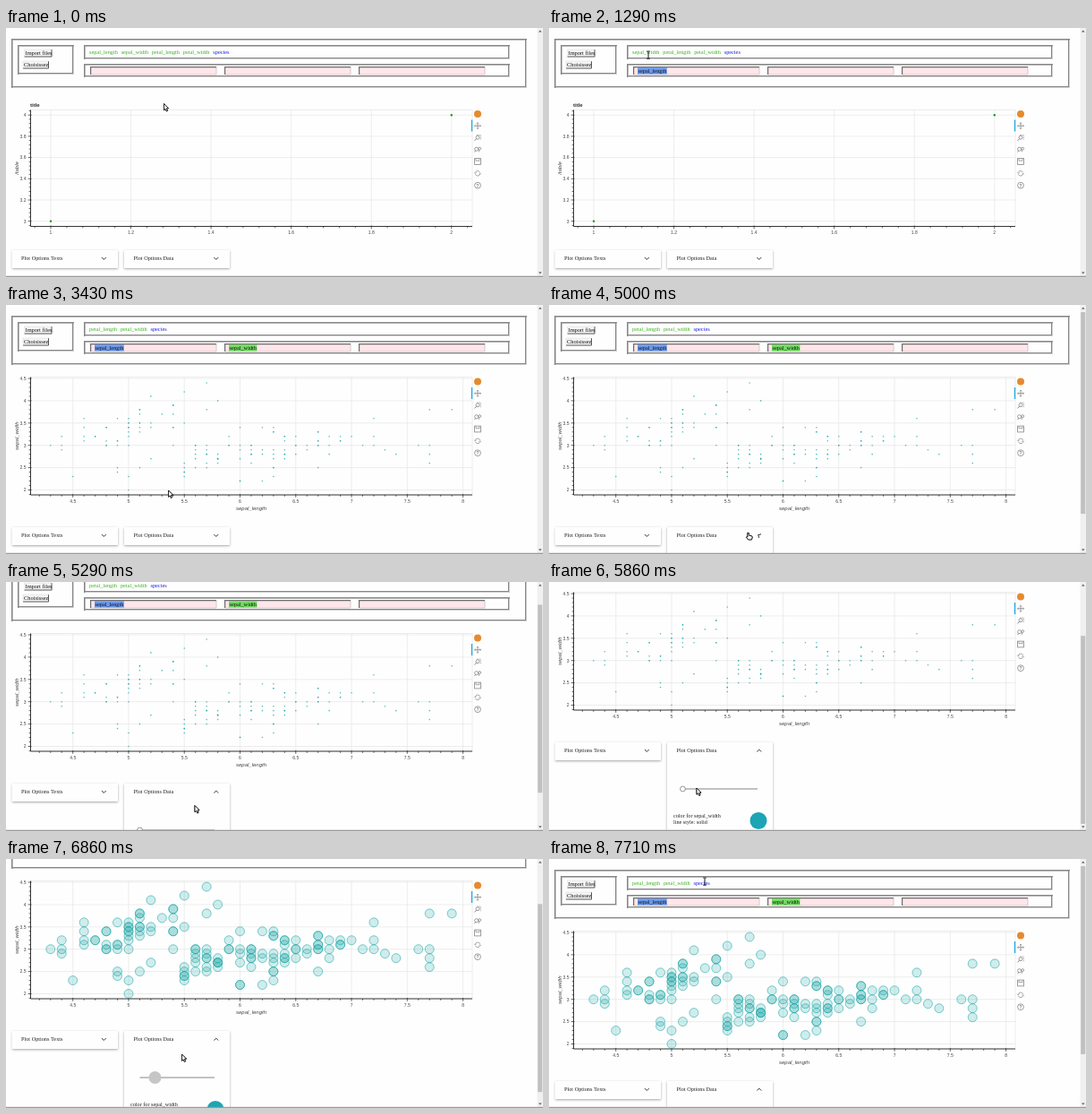
Animation, 600 px wide and 278 px high, one loop 8000 ms. Source, as an HTML page with a canvas:

```html
<!DOCTYPE html>
<html lang="en">
<head>
<meta charset="utf-8">
<title>Plot builder</title>
<style>
  html, body { margin: 0; width: 100%; height: 100%; overflow: hidden; background: #fefefe; }
  canvas { display: block; width: 600px; height: 278px; }
</style>
</head>
<body>
<canvas id="stage"></canvas>
<script>
const W = 600, H = 278, LOOP = 8000, FPS = 7;
const SERIF = '"Liberation Serif", serif', SANS = '"Liberation Sans", sans-serif';
const TEAL = '#1ba5b5', DARK = '#858585';
const canvas = document.getElementById('stage');
const dpr = window.devicePixelRatio || 1;
canvas.width = W * dpr;
canvas.height = H * dpr;
const c = canvas.getContext('2d');

// Sepal widths in mm, one row per sepal length from 4.3 cm in steps of 0.1
const widths = [
  [30], [29, 30, 32], [23], [31, 34, 36, 32], [32, 32], [34, 34, 30, 31, 30],
  [30, 31, 31, 36, 24, 25], [36, 34, 30, 34, 32, 35, 35, 33, 20, 23],
  [35, 35, 38, 37, 33, 34, 38, 25], [35, 34, 41, 27], [37], [39, 37, 39, 34, 34, 30],
  [42, 35, 23, 24, 24, 25, 26], [29, 30, 25, 30, 27, 28], [44, 38, 28, 26, 30, 29, 28, 25],
  [40, 27, 27, 26, 27, 28], [30, 32, 30], [22, 29, 27, 34, 22, 30], [29, 28, 28, 30, 30, 26],
  [22, 29, 28, 34], [33, 25, 23, 33, 29, 27, 28, 34, 25], [32, 29, 27, 32, 28, 28, 31],
  [28, 30, 32, 30], [29, 30], [31, 30, 31, 25, 33, 33, 30], [28, 30, 32], [31, 32, 31],
  [32], [30], [36, 32, 30], [29], [28], [], [30], [38, 26, 28, 30], [], [38]
];

const emptyPlot = {
  top: 91.5, bottom: 221.5, xLabel: '', yLabel: '/table', yLabelX: 13.5, title: 'title',
  x: { start: 1, step: 0.2, px: 50, gap: 89.55 },
  y: { start: 3, step: 0.2, px: 215.7, gap: -23.7 }
};
const irisPlot = {
  top: 80.5, bottom: 212, xLabel: 'sepal_length', yLabel: 'sepal_width', yLabelX: 13.5, title: '',
  x: { start: 4.5, step: 0.5, px: 74.7, gap: 62.27 },
  y: { start: 2, step: 0.5, px: 206.5, gap: -24.9 }
};

// Keys are [tick, value, value...] with seven ticks per second
const cursorKeys = [
  [0, 176.5, 84.5], [3, 110, 28], [4, 111, 29], [6, 118, 48], [7, 118, 48], [9, 111, 30],
  [10, 111, 29], [14, 274, 48], [17, 274, 48], [24, 181.5, 207], [27, 173, 25],
  [29, 366, 150], [32, 226, 257], [33, 222.5, 254.5], [36, 222.5, 254.5], [41, 165, 230],
  [43, 149.5, 231], [45, 166.5, 231], [46, 166.5, 231], [48, 196.5, 218], [51, 190, 60], [54, 174, 25]
];
const scrollKeys = [[0, 0], [36, 0], [39, 69], [47, 69], [48, 56], [51, 0]];
const openKeys = [[0, 0], [34, 0], [35, 0.66], [36, 1]];
const sliderKeys = [[0, 0], [43, 0], [45, 1]];

function sample(keys, k) {
  const i = keys.findIndex(key => key[0] > k);
  if (i < 0) return keys[keys.length - 1].slice(1);
  const a = keys[i - 1], b = keys[i], f = (k - a[0]) / (b[0] - a[0]);
  return a.slice(1).map((v, j) => v + (b[j + 1] - v) * f);
}

function text(s, x, y, size, color = '#222', align = 'left', style = '', family = SERIF) {
  c.font = `${style} ${size}px ${family}`;
  c.fillStyle = color;
  c.textAlign = align;
  c.fillText(s, x, y);
}

function rect(x, y, w, h, color) {
  c.fillStyle = color;
  c.fillRect(x, y, w, h);
}

function path(points, color, width = 1, close = false) {
  c.beginPath();
  points.forEach(([x, y]) => c.lineTo(x, y));
  if (close) c.closePath();
  c.strokeStyle = color;
  c.lineWidth = width;
  c.stroke();
}

function disc(x, y, r, fill, stroke, width = 1) {
  c.beginPath();
  c.arc(x, y, r, 0, Math.PI * 2);
  if (fill) { c.fillStyle = fill; c.fill(); }
  if (stroke) { c.strokeStyle = stroke; c.lineWidth = width; c.stroke(); }
}

function groove(x, y, w, h) {
  c.strokeStyle = '#d2d2d2';
  c.lineWidth = 2;
  c.strokeRect(x + 1, y + 1, w - 2, h - 2);
  rect(x, y, w, 1.3, DARK);
  rect(x, y, 1.3, h, DARK);
  rect(x + 1, y + h - 2, w - 2, 1, DARK);
  rect(x + w - 2, y + 1, 1, h - 2, DARK);
}

function button(label, x, y, w) {
  rect(x, y, w, 8, '#f4f4f4');
  path([[x, y + 8], [x + w, y + 8], [x + w, y]], '#444', 0.9);
  path([[x, y + 8], [x, y], [x + w, y]], '#ddd', 0.6);
  text(label, x + 1, y + 6.2, 6.4, '#111');
}

function slot(x, label, color) {
  rect(x, 43, 141, 9, '#ffe6ea');
  path([[x + 141, 43.5], [x + 141, 52], [x + 1, 52]], '#c9c0c2', 0.8);
  path([[x + 0.6, 52], [x + 0.6, 43.6], [x + 141, 43.6]], '#6c6c6c', 1.2);
  if (!label) return;
  c.font = `6.3px ${SERIF}`;
  rect(x + 5, 44.2, c.measureText(label).width + 1, 7.4, color);
  text(label, x + 5.5, 49.7, 6.3, '#111');
}

function header(k) {
  groove(6, 12, 576, 55);
  groove(13, 19, 63, 33);
  groove(87, 19, 476, 16);
  groove(87, 40, 476, 15);
  button('Import files', 20.5, 24, 30.5);
  button('Choisissez', 19, 37, 28.5);
  const first = k >= 6, second = k >= 14;
  let names = ['sepal_length', 'sepal_width', 'petal_length', 'petal_width', 'species'];
  names = names.slice(first + second);
  let x = 93;
  for (const name of names) {
    text(name, x, 29, 6.3, name === 'species' ? '#1b1be0' : '#3cb124');
    x += c.measureText(name).width + 3.8;
  }
  slot(94, first && 'sepal_length', '#6a98ee');
  slot(244, second && 'sepal_width', '#70dc60');
  slot(394);
}

function axis(p, ax, horizontal) {
  const lo = horizontal ? 27 : p.top, hi = horizontal ? 521 : p.bottom;
  for (let m = -10; m <= 50; m++) {
    const v = ax.px + m * ax.gap / 5;
    if (v < lo || v > hi) continue;
    const major = m % 5 === 0, out = major ? 2.8 : 1.8, inner = major ? 1 : 0;
    const label = String(+(ax.start + m / 5 * ax.step).toFixed(1));
    if (horizontal) {
      if (major) path([[v, p.top], [v, p.bottom]], '#e6e6e6', 0.7);
      path([[v, p.bottom - inner], [v, p.bottom + out]], '#222', 0.7);
      if (major) text(label, v, p.bottom + 8.9, 5, '#444', 'center', '', SANS);
    } else {
      if (major) path([[27, v], [521, v]], '#e6e6e6', 0.7);
      path([[27.5 + inner, v], [27.5 - out, v]], '#222', 0.7);
      if (major) text(label, 22.5, v + 1.8, 5, '#444', 'right', '', SANS);
    }
  }
}

function plot(p) {
  c.strokeStyle = '#e6e6e6';
  c.lineWidth = 0.7;
  c.strokeRect(27.5, p.top, 493.5, p.bottom - p.top);
  axis(p, p.x, true);
  axis(p, p.y, false);
  path([[27.5, p.top], [27.5, p.bottom], [521, p.bottom]], '#222', 0.9);
  text(p.title, 27, 88, 6, '#333', 'left', 'bold', SANS);
  text(p.xLabel, 274, p.bottom + 17.3, 6, '#444', 'center', 'italic', SANS);
  c.save();
  c.translate(p.yLabelX, (p.top + p.bottom) / 2);
  c.rotate(-Math.PI / 2);
  text(p.yLabel, 0, 0, 6, '#444', 'center', 'italic', SANS);
  c.restore();
}

function irisPoints(grow) {
  const r = 0.8 + 4.2 * grow;
  const fill = `rgba(27,165,165,${0.75 - 0.55 * grow})`;
  const stroke = grow ? 'rgba(27,165,165,0.7)' : null;
  widths.forEach((row, i) => row.forEach(w => {
    const x = irisPlot.x.px + (i - 2) * irisPlot.x.gap / 5;
    const y = irisPlot.y.px + (w - 20) * irisPlot.y.gap / 5;
    disc(x, y, r, fill, stroke, 0.8);
  }));
}

function toolbar(y) {
  const g = '#858585', x = 527;
  disc(x, y, 4, '#e58a2f');
  rect(519.8, y + 6.5, 1.4, 13, '#26aae1');
  c.save();
  c.translate(x, y + 13.2);
  path([[-3.5, 0], [3.5, 0]], g, 0.8);
  path([[0, -3.5], [0, 3.5]], g, 0.8);
  for (let i = 0; i < 4; i++) {
    c.rotate(Math.PI / 2);
    path([[-1.2, -2.4], [0, -3.6], [1.2, -2.4]], g, 0.7);
  }
  c.restore();
  c.save();
  c.translate(x, y + 26.5);
  c.setLineDash([1, 0.7]);
  path([[-1, -3], [3.3, -3], [3.3, 2.5]], g, 0.7);
  c.setLineDash([]);
  disc(0, -0.3, 2, null, g, 0.8);
  path([[-1.4, 1.2], [-3.5, 3.4]], g, 1);
  c.translate(0, 13.3);
  disc(-1.4, -0.6, 2, null, g, 0.8);
  disc(2.2, -1.2, 1.4, null, g, 0.8);
  path([[-2.4, 1], [-3.4, 2.8]], g, 0.9);
  path([[1.6, 0.4], [1.2, 2.6]], g, 0.8);
  c.translate(0, 13.2);
  c.strokeStyle = g;
  c.lineWidth = 0.8;
  c.strokeRect(-3.4, -3.4, 6.8, 6.8);
  path([[-2, -3], [-2, -0.8], [2, -0.8], [2, -3]], g, 0.7);
  c.translate(0, 13.3);
  for (const a of [0.3, Math.PI + 0.3]) {
    c.beginPath();
    c.arc(0, 0, 2.8, a, a + 2.5);
    c.stroke();
  }
  path([[-3.8, -1], [-2.6, 0.2], [-1.5, -1.1]], g, 0.7);
  path([[3.8, 1], [2.6, -0.2], [1.5, 1.1]], g, 0.7);
  c.translate(0, 13.4);
  disc(0, 0, 3.4, null, g, 0.8);
  text('?', 0, 1.9, 5.4, g, 'center', 'bold', SANS);
  c.restore();
}

function panel(label, x, w, height, open) {
  c.save();
  c.shadowColor = 'rgba(0,0,0,0.35)';
  c.shadowBlur = 2.5 * dpr;
  c.shadowOffsetY = 0.9 * dpr;
  rect(x, 248, w, height, '#fefefe');
  c.restore();
  text(label, x + 10.5, 259.2, 6.25);
  c.save();
  c.translate(x + 102.8, 257.3);
  c.rotate(Math.PI * open);
  path([[-2.4, -1.2], [0, 1.2], [2.4, -1.2]], '#333', 1);
  c.restore();
}

function panels(k, open, slide) {
  panel('Plot Options Texts', 6.5, 118.5, 20, 0);
  panel('Plot Options Data', 132, 118, 20 + 78 * open, open);
  if (!open) return;
  c.save();
  c.beginPath();
  c.rect(132, 268, 118, 78 * open);
  c.clip();
  const x = 149.5 + 17 * slide;
  path([[149.5, 300], [233, 300]], '#777', 0.9);
  if (k >= 43) disc(x, 300, 7, '#c6c6c6');
  else disc(x, 300, 2.9, '#fefefe', '#888', 0.9);
  text('color for sepal_width', 139, 331.5, 6.2);
  text('line style: solid', 139, 338.8, 6.2);
  disc(234, 335.5, 9.5, TEAL);
  c.restore();
}

function scrollbar(scroll, extra) {
  rect(593.5, 0, 6.5, H, '#f0f0f0');
  if (extra) {
    const len = 262 * H / (H + extra);
    rect(594.2, 8 + scroll / extra * (262 - len), 5, len, '#c0c0c0');
  }
  for (const [y, d] of [[3.5, -1], [273.5, 1]]) {
    c.beginPath();
    c.moveTo(595, y - d);
    c.lineTo(598.6, y - d);
    c.lineTo(596.8, y + d);
    c.fillStyle = '#555';
    c.fill();
  }
}

function outline(points) {
  c.lineJoin = 'round';
  path(points, '#111', 1, true);
  c.fillStyle = '#fff';
  c.fill();
  path(points, '#111', 0.8, true);
  c.lineJoin = 'miter';
}

function cursor(k, x, y) {
  c.save();
  c.translate(x, y);
  const beam = k === 3 || k === 9 || k >= 53;
  const dragging = (k > 3 && k < 6) || (k > 9 && k < 14);
  const hand = dragging || (k >= 32 && k <= 36) || (k >= 43 && k <= 46);
  if (dragging) {
    c.globalAlpha = 0.6;
    text(k < 6 ? 'sepal_length' : 'sepal_width', -18, 1, 6.3, '#3cb124');
    c.globalAlpha = 1;
  }
  if (beam) {
    path([[0, -3.5], [0, 4]], '#111', 1);
    path([[-1.8, -4], [1.8, -4]], '#111', 0.9);
    path([[-1.8, 4.2], [1.8, 4.2]], '#111', 0.9);
  } else if (hand) {
    outline([[-0.7, 0], [0.7, 0], [0.9, 2.8], [4, 3.4], [4.6, 4.6], [4, 7.4], [0, 7.4], [-2, 4.8], [-1.5, 4], [-0.5, 4.6]]);
  } else {
    outline([[0, 0], [0, 7.2], [1.6, 5.8], [2.8, 8.4], [4, 7.9], [2.9, 5.3], [5, 5.1]]);
  }
  c.restore();
}

function draw(ms) {
  const k = Math.min(54, Math.floor((ms + 5) * FPS / 1000));
  const [scroll] = sample(scrollKeys, k), [open] = sample(openKeys, k), [slide] = sample(sliderKeys, k);
  c.setTransform(dpr, 0, 0, dpr, 0, 0);
  rect(0, 0, W, H, '#fefefe');
  c.save();
  c.translate(0, -scroll);
  header(k);
  if (k < 18) {
    plot(emptyPlot);
    disc(50, 215.7, 1.2, '#189a18');
    disc(497.8, 97.2, 1.2, '#189a18');
    toolbar(96);
  } else {
    plot(irisPlot);
    irisPoints(slide);
    toolbar(85.5);
  }
  panels(k, open, slide);
  c.restore();
  scrollbar(scroll, 69 * open);
  rect(0, 276.8, W, 1.2, '#9a9a9a');
  cursor(k, ...sample(cursorKeys, k));
}

const begin = performance.now();
function tick() {
  draw((performance.now() - begin) % LOOP);
  requestAnimationFrame(tick);
}
tick();
</script>
</body>
</html>
```
